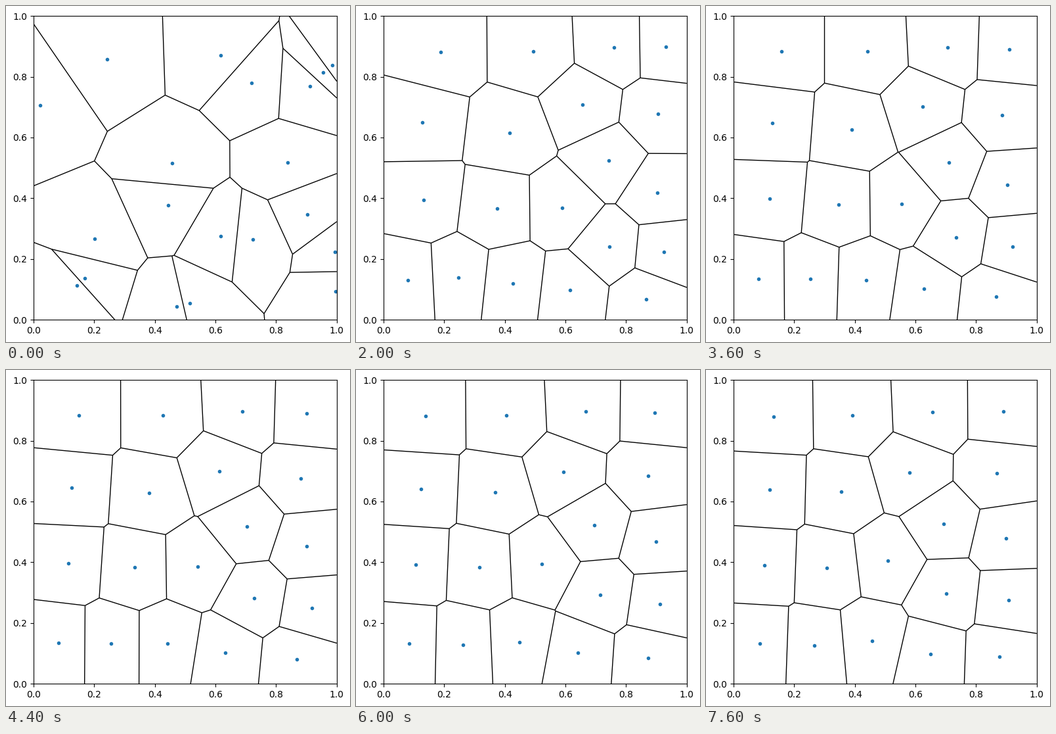
Write a matplotlib script that moves like this. It is 524x511 px and loops after 8000 ms.

```python
import numpy as np
import matplotlib.pyplot as plt
from matplotlib.animation import FuncAnimation
from matplotlib.collections import LineCollection

W, H, DPI = 524, 511, 100
SIDE = 462
STEPS, INTERVAL = 20, 400

# Scattered starting sites; Lloyd relaxation does all the rest.
START = [(.2429, .8580), (.6172, .8705), (.7185, .7805), (.9547, .8148),
         (.9855, .8373), (.9120, .7685), (.0221, .7061), (.4571, .5156),
         (.4442, .3771), (.8381, .5177), (.9030, .3468), (.6173, .2755),
         (.7234, .2643), (.9939, .2234), (.9961, .0935), (.2017, .2667),
         (.1697, .1364), (.1434, .1128), (.4722, .0440), (.5158, .0541)]


def clip(poly, nx, ny, c, label):
    """Keep the part of poly where nx*x + ny*y <= c.

    Each entry is (x, y, neighbour across the edge that starts there)."""
    out = []
    for (ax, ay, la), (bx, by, _) in zip(poly, poly[1:] + poly[:1]):
        da = nx * ax + ny * ay - c
        db = nx * bx + ny * by - c
        if da <= 0:
            out.append((ax, ay, la))
        if (da <= 0) != (db <= 0):
            t = da / (da - db)
            out.append((ax + t * (bx - ax), ay + t * (by - ay),
                        label if da <= 0 else la))
    return out


def voronoi_cell(sites, i):
    x, y = sites[i]
    poly = [(0, 0, -1), (1, 0, -1), (1, 1, -1), (0, 1, -1)]
    for j, (u, v) in enumerate(sites):
        if j != i:
            c = (u * u + v * v - x * x - y * y) / 2
            poly = clip(poly, u - x, v - y, c, j)
    return poly


def centroid(poly):
    x, y = np.array([p[:2] for p in poly]).T
    x2, y2 = np.roll(x, -1), np.roll(y, -1)
    cross = x * y2 - x2 * y
    area3 = 3 * cross.sum()
    return (x + x2) @ cross / area3, (y + y2) @ cross / area3


def inner_edges(cells):
    """Every edge between two cells, once."""
    return [(a[:2], b[:2])
            for i, poly in enumerate(cells)
            for a, b in zip(poly, poly[1:] + poly[:1]) if a[2] > i]


def relax(sites):
    states = []
    for _ in range(STEPS):
        cells = [voronoi_cell(sites, i) for i in range(len(sites))]
        states.append((np.array(sites), inner_edges(cells)))
        sites = [centroid(cell) for cell in cells]
    return states


states = relax(START)

fig = plt.figure(figsize=(W / DPI, H / DPI), dpi=DPI)
ax = fig.add_axes([41.8 / W, 33.8 / H, SIDE / W, SIDE / H])
ax.set_xlim(0, 1)
ax.set_ylim(0, 1)
dots, = ax.plot([], [], ".")
lines = ax.add_collection(LineCollection([], colors="k", linewidths=1.0))


def draw(step):
    sites, edges = states[step]
    dots.set_data(sites[:, 0], sites[:, 1])
    lines.set_segments(edges)
    return dots, lines


anim = FuncAnimation(fig, draw, frames=STEPS, interval=INTERVAL,
                     repeat=True, repeat_delay=0)
plt.show()
```
